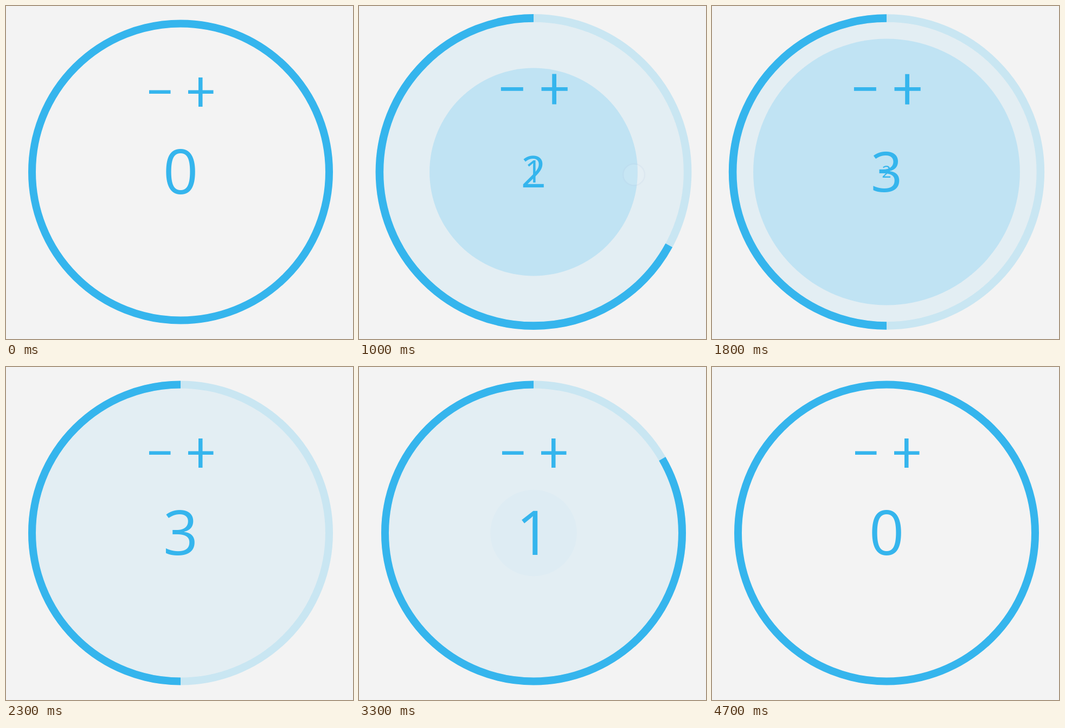
Write an HTML page that moves like this. It is 640 px wide and 615 px high and loops after 4800 ms.

```html
<!DOCTYPE html>
<html lang="en">
<head>
<meta charset="utf-8">
<title>Tap counter</title>
<style>
  html, body { margin: 0; height: 100%; overflow: hidden; background: #f3f3f3; }
  svg { display: block; width: 100vw; height: 100vh; }
  .blue { fill: #35b5ed; }
  .ring { fill: none; stroke: #35b5ed; stroke-width: 14; }
  text { font: 400 113px "Open Sans", "Noto Sans", sans-serif; text-anchor: middle; }
</style>
</head>
<body>
<svg viewBox="0 0 640 615">
  <g id="dial">
    <circle id="ripple" class="blue"/>
    <g id="track">
      <circle class="blue" r="267" opacity=".083"/>
      <circle class="ring" r="274" opacity=".22"/>
    </g>
    <circle id="arc" class="ring" r="274" pathLength="360" transform="rotate(-90)"/>
    <path class="blue" d="M-58-151h39.500v6.500h-39.500zM14-151h46.500v6.500h-46.500zM33-174.500h7.500v54h-7.500z"/>
  </g>
  <text id="oldDigit" class="blue" y="40"></text>
  <text id="newDigit" class="blue" y="40">0</text>
  <circle id="touch" cy="311.500" r="20" fill="#f3f8fc" stroke="#b9c8e2" stroke-width="2.500"/>
</svg>
<script>
const LOOP = 4800;
const taps = [
  { at: 200, from: 0, to: 1 },
  { at: 900, from: 1, to: 2 },
  { at: 1655, from: 2, to: 3 },
  { at: 2460, from: 3, to: 2 },
  { at: 2940, from: 2, to: 1 },
  { at: 3455, from: 1, to: 0 }
];
const idle = { at: -2000, from: 0, to: 0 };
const el = id => document.getElementById(id);
const set = (id, attrs) => {
  for (const name in attrs) el(id).setAttribute(name, attrs[name]);
};
const clamp = v => Math.max(0, Math.min(1, v));
const easeOut = (v, power) => 1 - (1 - clamp(v)) ** power;
const place = s => `translate(322 306.5) scale(${s})`;

function drawDigit(id, value, scale) {
  el(id).textContent = value;
  set(id, { transform: place(scale), opacity: scale > 0.01 ? 1 : 0 });
}

function drawRipple(tap, age) {
  if (tap.to > tap.from) {
    set("ripple", { r: 287 * easeOut(age / 250, 2), opacity: 0.2 * clamp((600 - age) / 400) });
  } else {
    const left = 1 - clamp(age / 500);
    set("ripple", { r: 287 * left, opacity: 0.08 * left });
  }
}

function draw(t) {
  const tap = taps.filter(p => p.at <= t).pop() || idle;
  const age = t - tap.at;

  // The dial swells slightly around each tap.
  const swell = taps.reduce((sum, p) =>
    sum + Math.sin(Math.PI * clamp((t - p.at + 60) / 360)) ** 2, 0);
  set("dial", { transform: place(1 + 0.038 * swell) });
  drawRipple(tap, age);

  const count = tap.from + (tap.to - tap.from) * easeOut(age / 120, 2);
  const gap = count * 60;
  set("track", { opacity: clamp(count * 4) });
  set("arc", { "stroke-dasharray": `${360 - gap} ${gap}`, "stroke-dashoffset": -gap });

  const p = clamp(age / 200);
  drawDigit("oldDigit", tap.from, 1 - p);
  drawDigit("newDigit", tap.to, easeOut(p, 1.8));

  const near = taps.find(p => Math.abs(t - p.at + 20) < 130);
  set("touch", {
    cx: near && near.to < near.from ? 137 : 507,
    opacity: near ? clamp((130 - Math.abs(t - near.at + 20)) / 60) : 0
  });
}

const start = performance.now();
function tick() {
  draw((performance.now() - start) % LOOP);
  requestAnimationFrame(tick);
}
tick();
</script>
</body>
</html>
```
